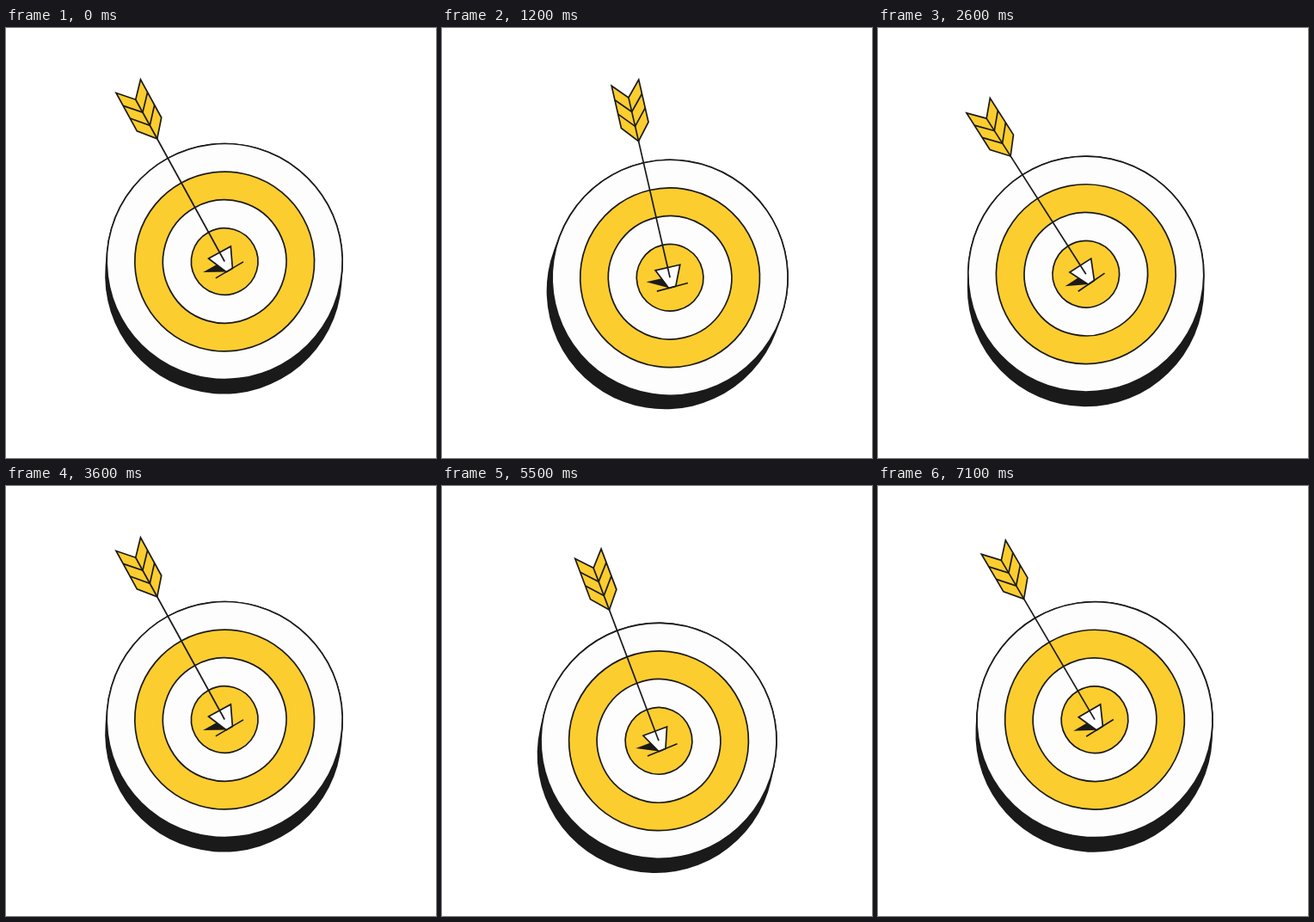
Animation of 500 by 500 pixels, one loop 7200 ms. Source, as an HTML page:

```html
<!DOCTYPE html>
<html lang="en">
<head>
<meta charset="utf-8">
<title>Bullseye</title>
<style>
  html, body { margin: 0; width: 100%; height: 100%; overflow: hidden; background: #fff; }
  svg { display: block; width: 100%; height: 100%; }
  .ink { stroke: #1a1a1a; stroke-width: 1.7; }
  .white { fill: #fdfdfd; }
  .yellow { fill: #fccd2f; }
  .line { fill: none; }
</style>
</head>
<body>
<svg viewBox="0 0 500 500">
  <g id="target" class="ink">
    <path d="M0 0L-9 13.7" stroke-width="275.5" stroke-linecap="round" style="stroke-width:275.5"/>
    <circle class="white" r="137"/>
    <circle class="yellow" r="104.4"/>
    <circle class="white" r="71.7"/>
    <circle class="yellow" r="38.8"/>

    <path d="M-28 -1.2H-9.7L-4 11.5Z" fill="#1a1a1a" stroke="none"/>
    <path class="white" d="M-14.7 -12H14.7L4.2 11.4L-4.2 11.7Z"/>
    <path class="line" d="M-18.4 12L18.9 10.8"/>

    <path class="yellow" d="M-16.4 -232.5L-.2 -214.8L16 -232.5V-182L-.2 -162.8L-16.4 -182Z"/>
    <path class="line" d="M-16.4 -215.6L-.2 -197.8L16 -215.6M-16.4 -198.8L-.2 -180.5L16 -198.8"/>
    <path class="line" d="M-.2 -214.8L0 0"/>
  </g>
</svg>
<script>
  const PERIOD = 3600, STEP = 100;
  const target = document.getElementById('target');

  // The board circles around a fixed point while rocking slightly out of phase.
  function draw(now) {
    const time = Math.floor(now / STEP) * STEP % PERIOD;
    const phase = time / PERIOD * 2 * Math.PI;
    const x = 254.2 + 12.6 * Math.sin(phase);
    const y = 284 - 12.5 * Math.cos(phase);
    const tilt = -23.8 + 10.9 * Math.sin(phase - 0.47);
    target.setAttribute('transform', `translate(${x} ${y}) rotate(${tilt})`);
  }

  const start = performance.now();
  function tick() {
    draw(performance.now() - start);
    requestAnimationFrame(tick);
  }
  tick();
</script>
</body>
</html>
```
